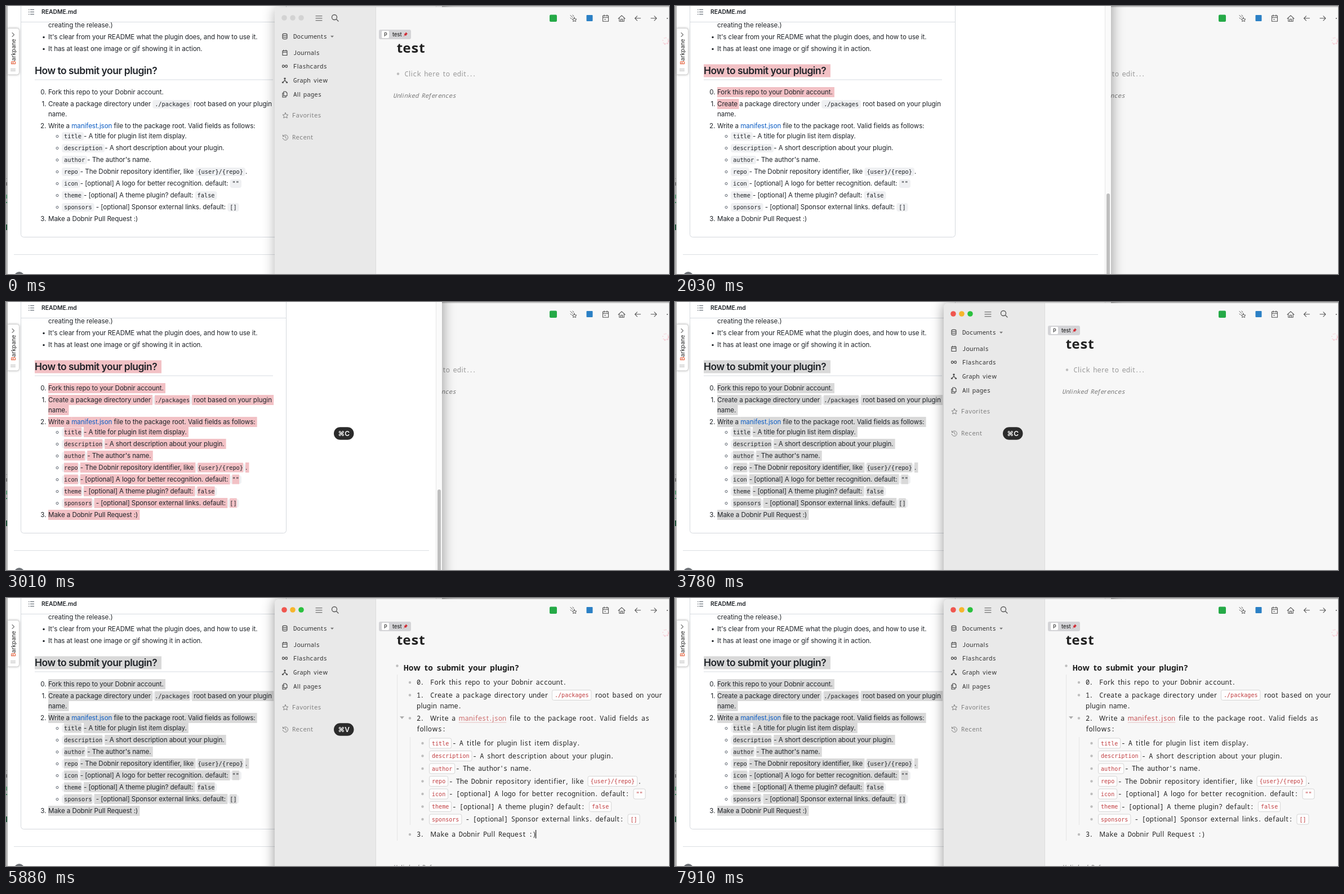
Write an HTML page with a canvas that moves like this. It is 1177x476 px and loops after 8 s.

```html
<!DOCTYPE html>
<html lang="en">
<head>
<meta charset="utf-8">
<title>Copy a README into an outliner</title>
<style>
html, body { margin: 0; width: 100%; height: 100%; overflow: hidden; background: #fff; }
canvas { display: block; }
</style>
</head>
<body>
<canvas id="stage" width="1177" height="476"></canvas>
<script>
const ctx = document.getElementById('stage').getContext('2d');
const LOOP = 8000, STEP = 70;
const SANS = 'Inter, sans-serif', MONO = '"DejaVu Sans Mono", monospace';
const NOTE = '"Noto Sans", sans-serif', NOTE_MONO = '"Noto Sans Mono", monospace';

const FIELDS = [
  '`title`- A title for plugin list item display.',
  '`description`- A short description about your plugin.',
  "`author`- The author's name.",
  '`repo`- The Dobnir repository identifier, like `{user}/{repo}`.',
  '`icon`- [optional] A logo for better recognition. default: `""`',
  '`theme`- [optional] A theme plugin? default: `false`',
  '`sponsors` - [optional] Sponsor external links. default: `[]`',
];
const README = [
  [75, 153, 'Fork this repo to your Dobnir account.'],
  [75, 174, 'Create a package directory under `./packages` root based on your plugin'],
  [75, 192, 'name.'],
  [75, 213, 'Write a ^manifest.json^ file to the package root. Valid fields as follows:'],
  ...FIELDS.map((s, i) => [99, 231 + 21 * i, s]),
  [75, 378, 'Make a Dobnir Pull Request :)'],
];
const ROWS = [115, ...README.map(row => row[1])];

const clamp = v => Math.max(0, Math.min(1, v));
const parts = s => s.split(/([`^][^`^]+[`^])/).filter(Boolean);

function rect(x, y, w, h, fill, r = 0, stroke) {
  ctx.beginPath();
  ctx.roundRect(x, y, w, h, r);
  if (fill) { ctx.fillStyle = fill; ctx.fill(); }
  if (stroke) { ctx.strokeStyle = stroke; ctx.lineWidth = 1; ctx.stroke(); }
}
function dot(x, y, r, fill, stroke) {
  ctx.beginPath();
  ctx.arc(x, y, r, 0, 7);
  if (fill) { ctx.fillStyle = fill; ctx.fill(); }
  if (stroke) { ctx.strokeStyle = stroke; ctx.lineWidth = 1; ctx.stroke(); }
}
function icon(x, y, d, color = '#555', width = 1.1, fill) {
  ctx.save();
  ctx.translate(x, y);
  ctx.lineCap = ctx.lineJoin = 'round';
  const path = new Path2D(d);
  ctx.lineWidth = width;
  ctx.strokeStyle = ctx.fillStyle = color;
  fill ? ctx.fill(path) : ctx.stroke(path);
  ctx.restore();
}
function text(s, x, y, font, color, spacing = 0) {
  ctx.font = font;
  ctx.letterSpacing = spacing + 'px';
  ctx.fillStyle = color;
  ctx.fillText(s, x, y);
  const w = ctx.measureText(s).width;
  ctx.letterSpacing = '0px';
  return w;
}
function windowFrame(x, y, w, h, fill, alpha, r) {
  ctx.save();
  ctx.shadowColor = `rgba(0,0,0,${alpha})`;
  ctx.shadowBlur = 22;
  rect(x, y, w, h, fill, r);
  ctx.restore();
}

// Four-width lettering: every glyph sits centred in a cell of .3, .45, .6 or .9 em.
const cell = c => /[ilj]/.test(c) ? .3 : /[frt .,'"()]/.test(c) ? .45 : /[mwMW]/.test(c) ? .9 : .6;
function note(s, x, y, size = 12, color = '#262626', style = '') {
  ctx.fillStyle = color;
  ctx.textAlign = 'center';
  for (const c of s) {
    const em = cell(c);
    ctx.font = `${style} ${size}px ${em === .6 ? NOTE_MONO : NOTE}`;
    ctx.fillText(c, x + em * size / 2, y + size * .35);
    x += em * size;
  }
  ctx.textAlign = 'left';
  return x;
}
function noteLine(x, y, s, linkColor) {
  for (const part of parts(s)) {
    const body = part.slice(1, -1);
    if (part[0] === '`') {
      ctx.font = `10.05px ${MONO}`;
      const w = ctx.measureText(body).width + 9;
      rect(x + 2, y - 9, w, 18, '#fdfdfd', 3, '#d6d6d6');
      text(body, x + 6.5, y + 3.5, ctx.font, '#c23f42');
      x += w + 3.5;
    } else if (part[0] === '^') {
      const end = note(body, x, y, 12, linkColor);
      rect(x, y + 7, end - x, 1, '#e6c0c0');
      x = end;
    } else x = note(part, x, y);
  }
}

function selection(t) {
  if (t < 1960) return null;
  const k = clamp(Math.floor((t - 1960) / STEP) / 9);
  const p = 1 - Math.pow(1 - k, 2.3);
  const mouseY = 112 + 266 * p;
  const row = ROWS.reduce((a, b) => Math.abs(b - mouseY) < Math.abs(a - mouseY) ? b : a);
  return { row, x: 70 + 183 * p, color: t < 3780 ? '#f2c1c5' : '#d9d9d9' };
}
function highlight(sel, x, y, w, half) {
  if (!sel || y > sel.row) return;
  const end = y < sel.row ? x + w : Math.min(x + w, sel.x);
  if (end > x) rect(x, y - half, end - x, half * 2, sel.color);
}
function readmeLine(x, y, s, sel) {
  for (const part of parts(s)) {
    const code = part[0] === '`', link = part[0] === '^';
    const body = code || link ? part.slice(1, -1) : part;
    const font = code ? `10.3px ${MONO}` : `11.6px ${SANS}`;
    const spacing = code ? 0 : -.07;
    ctx.font = font;
    ctx.letterSpacing = spacing + 'px';
    const w = ctx.measureText(body).width;
    const last = !code && s.endsWith(part) ? 3.2 : 0;
    ctx.letterSpacing = '0px';
    if (code) {
      rect(x, y - 7, w + 8, 15, '#eff0f2', 4);
      x += 4;
    }
    highlight(sel, x, y, w + last, code ? 8.5 : 9);
    text(body, x, y + 4, font, link ? '#0b5cc4' : '#1f2328', spacing);
    x += w + (code ? 4 : 0);
  }
}

function drawBrowser(t) {
  const sel = selection(t);
  windowFrame(2, -40, 772, 600, '#fff', .42);
  rect(2, 0, 1, 476, '#b4b4b4');
  rect(763, 0, 11, 476, '#fafafa');
  rect(763, 0, 1, 476, '#e6e6e6');
  rect(766, 333, 6, 160, '#bfbfbf', 3);

  rect(26.5, -20, 471, 430.5, null, 5, '#d4d8dd');
  readmeLine(75, 34, 'creating the release.)');
  rect(27, 0, 470, 28, '#fff');
  rect(27, 28, 470, 1, '#d8dce1');
  for (const y of [6.5, 10.5, 14.5]) {
    rect(40, y - .5, 1.5, 1.3, '#57606a');
    rect(43, y - .5, 7, 1.1, '#57606a');
  }
  text('README.md', 63, 14.2, `600 10.3px ${SANS}`, '#1f2328');

  readmeLine(75, 55, "It's clear from your README what the plugin does, and how to use it.");
  readmeLine(75, 76, 'It has at least one image or gif showing it in action.');
  dot(67, 55.5, 1.7, '#1f2328');
  dot(67, 76.5, 1.7, '#1f2328');

  highlight(sel, 51, 115, 225, 11.5);
  text('How to submit your plugin?', 51, 121, `600 17.45px ${SANS}`, '#1f2328', -.48);
  rect(51, 130.5, 423, 1, '#d8dce1');

  for (const [x, y, s] of README) {
    readmeLine(x, y, s, sel);
    if (x === 99) dot(91, y + .5, 2, null, '#57606a');
  }
  [153, 174, 213, 378].forEach((y, i) => {
    ctx.textAlign = 'right';
    text(i + '.', 71.5, y + 4, `11.6px ${SANS}`, '#1f2328');
    ctx.textAlign = 'left';
  });
  rect(14, 441, 737, 1, '#dcdfe3');
  dot(23.5, 481, 9, '#6e7277');

  // Side tab
  ctx.save();
  ctx.shadowColor = 'rgba(0,0,0,.3)';
  ctx.shadowBlur = 4;
  rect(3, 39.5, 20.5, 82.5, '#fff', [0, 4, 4, 0]);
  ctx.restore();
  rect(3, 39.5, 20.5, 82.5, null, [0, 4, 4, 0], '#d0d0d0');
  icon(12.5, 51, 'M-1.5-3.5L2 0L-1.5 3.5', '#777');
  icon(12.5, 113.5, 'M-4-1.5H4M-4 1.5H4', '#aaa', 1);
  ctx.save();
  ctx.translate(16.5, 104);
  ctx.rotate(-Math.PI / 2);
  const w = text('B', 0, 0, `500 10px ${SANS}`, '#e0522a');
  text('arkpane', w, 0, `500 10px ${SANS}`, '#444');
  ctx.restore();
}

function drawSidebar() {
  note('Documents', 510, 54, 10.8, '#333');
  icon(579, 54, 'M-3-1.2H3L0 2Z', '#777', 1, true);
  ['Journals', 'Flashcards', 'Graph view', 'All pages'].forEach((s, i) => note(s, 510, 83 + 24.7 * i, 10.8, '#333'));
  note('Favorites', 508, 194.5, 10.8, '#808080');
  note('Recent', 508, 233.5, 10.8, '#808080');
  icon(495, 54, 'M-4-3C-4-5.5 4-5.5 4-3C4-1-4-1-4-3V3C-4 5.2 4 5.2 4 3V-3M-4 0C-4 2 4 2 4 0', '#444');
  icon(495, 83, 'M-4-3.5H4V4.5H-4ZM-4-.7H4M-2-5V-3M2-5V-3', '#444');
  icon(495, 107, 'M0 0C-2-3-4.5-2.5-4.5 0S-2 3 0 0S4.5-2.5 4.5 0S2 3 0 0', '#444', 1.2);
  icon(495, 132, 'M0-3V0L-3 3M0 0L3 3M-1-4H1V-2.5H-1ZM-4.5 3H-2.7V4.5H-4.5ZM2.7 3H4.5V4.5H2.7Z', '#444');
  icon(495, 157, 'M-2-5H1.5L4-2.5V2.5H-2ZM-2-2.5H-4V5H2V2.5', '#444');
  icon(496, 194.5, 'M0-5L1.5-1.6L5-1.3L2.4 1L3.2 4.5L0 2.7L-3.2 4.5L-2.4 1L-5-1.3L-1.5-1.6Z', '#808080', 1);
  icon(496, 233.5, 'M-4-2.5A4.7 4.7 0 1 1-4.7 1M-4.5-4.5V-2H-2M0-2.5V.3L2 1.5', '#808080', 1);
}

function drawToolbar(active) {
  ['#f0564f', '#f6b52c', '#2ac13e'].forEach((c, i) => dot(494 + 15 * i, 21, 4.8, active ? c : '#d3d3d3'));
  icon(555.5, 21.8, 'M-5.5-4H5.5M-5.5 0H5.5M-5.5 4H5.5');
  icon(583.5, 21, 'M4-1A4.5 4.5 0 1 1-5-1A4.5 4.5 0 1 1 4-1M3 2.5L6.5 6', '#555', 1.3);
  rect(965, 15.5, 13, 12.5, '#25aa47', 2);
  icon(1007, 21.5, 'M2-1L3.3 1.5L6 1.8L4 3.6L4.5 6L2 4.8L-.3 6L.2 3.6L-1.7 1.8L.8 1.5ZM-5-5L-1-1M-1-5.5L1-3M-5-.5L-3 1.5', '#555', 1);
  rect(1030.5, 16, 11, 11, '#2b80c5', 1);
  icon(1064.5, 21.8, 'M-5-4.5H5V5.5H-5ZM-5-1.3H5M-2.5-6V-3.5M2.5-6V-3.5M-2 2H0');
  icon(1093, 21.8, 'M-6 .5L0-5L6 .5M-4.2-1V5.5H4.2V-1M-1.5 5.5V1.5H1.5V5.5');
  icon(1121.5, 21.8, 'M5 0H-5M-1-4L-5 0L-1 4');
  icon(1150, 21.8, 'M-5 0H5M1-4L5 0L1 4');
  dot(1174, 22, 1, '#555');
  for (let i = 0; i < 9; i++) dot(1171 + 5 * Math.cos(i * 2.4), 62 + 5.5 * Math.sin(i * 2.4), i % 3 ? .9 : 1.5, '#f7cdd5');
}

function drawOutline(t) {
  const link = t < 7910 ? '#cd6d6d' : '#c65457';
  const bullet = (x, y) => dot(x, y, 2.2, '#bdbdbd');
  const arrow = (x, y, alpha) => {
    ctx.globalAlpha = clamp(alpha);
    icon(x, y, 'M-4-2.2H4L0 2.3Z', '#aaa', 1, true);
    ctx.globalAlpha = 1;
  };
  rect(694, 136, 1, 295, '#e5e5e5');
  rect(717, 247, 1, 156, '#e5e5e5');
  bullet(694.5, 120.5);
  arrow(681, 120, 1 - (t - 4970) / 350);
  arrow(703, 212.5, (t - 5390) / 490);
  note('How to submit your plugin?', 706, 123.5, 14.4, '#222', 'bold');

  const items = [
    [150, 'Fork this repo to your Dobnir account.'],
    [172.5, 'Create a package directory under `./packages` root based on your', 'plugin name.'],
    [213.5, 'Write a ^manifest.json^ file to the package root. Valid fields as', 'follows:'],
    [420, 'Make a Dobnir Pull Request :)'],
  ];
  items.forEach(([y, first, second], i) => {
    bullet(717, y);
    note(i + '.', 729, y);
    noteLine(753.3, y, first, link);
    if (second) note(second, 729, y + 19);
  });
  FIELDS.forEach((s, i) => {
    const y = 258 + 22.5 * i;
    bullet(739.5, y);
    noteLine(749.5, y, s);
  });
  if (Math.floor((t - 4775) / 548) % 2 === 0) rect(940, 412, 1.2, 15, '#222');
}

function drawNotes(t) {
  windowFrame(477, 2, 760, 560, '#f7f7f7', t < 3780 ? .3 : .42, 8);
  rect(477, 2, 180, 560, '#e9e9e9', [8, 0, 0, 0]);
  rect(656, 2, 1, 474, '#dcdcdc');
  drawSidebar();
  drawToolbar(t >= 3780);

  rect(662, 42, 57, 17, '#d4d4d7', 3);
  rect(667, 44, 13, 13, '#fff', 2);
  text('P', 671, 54, `500 9px ${SANS}`, '#333');
  text('test', 686, 54, `500 9.2px ${SANS}`, '#222');
  icon(709, 50.5, 'M1-4L4-1L2.5 0L1 2.5L-.5 1.5L-3.5 4L-1.3 .7L-2.5-.8L0-2Z', '#d02c35', 1, true);
  note('test', 693.5, 74.5, 24, '#222', 'bold');

  const pasted = t >= 4760, editing = t >= 4340;
  note('Unlinked References', 687, pasted ? 478 : editing ? 175 : 159.5, 10.8, '#777', 'italic');
  if (pasted) return drawOutline(t);
  dot(696, 120.5, 2.2, '#bdbdbd');
  if (editing) rect(708, 113, 1.2, 15, '#222');
  else note('Click here to edit...', 707.5, 121, 12.2, '#999');
}

function drawKey(label, y, alpha) {
  ctx.globalAlpha = clamp(alpha);
  rect(582, y - 11.3, 35.5, 22.6, '#2b2b2b', 11.3);
  ctx.textAlign = 'center';
  text(label, 599.7, y + 4.3, '600 12px Inter, "DejaVu Sans", sans-serif', '#fff');
  ctx.textAlign = 'left';
  ctx.globalAlpha = 1;
}

function draw(t) {
  rect(0, 0, 1177, 476, '#e4e4e4');
  rect(0, 306, 2, 1, '#bbb');
  rect(0, 313, 2, 6, '#999');
  rect(0, 335, 2, 7, '#7cc49a');
  rect(0, 348, 2, 2, '#4faa78');
  rect(0, 388, 2, 10, '#2c6b4b');
  const browserInFront = t >= 910 && t < 3780;
  const windows = [drawBrowser, drawNotes];
  if (browserInFront) windows.reverse();
  windows.forEach(paint => paint(t));

  if (t >= 3010 && t < 5320) drawKey('⌘C', t < 4690 ? 233.5 : 203.5, 1 - (t - 4970) / 350);
  if (t >= 4690 && t < 6930) drawKey('⌘V', 233.5, 1 - (t - 6720) / 210);
}

function tick() {
  draw(performance.now() % LOOP);
  requestAnimationFrame(tick);
}
tick();
</script>
</body>
</html>
```
